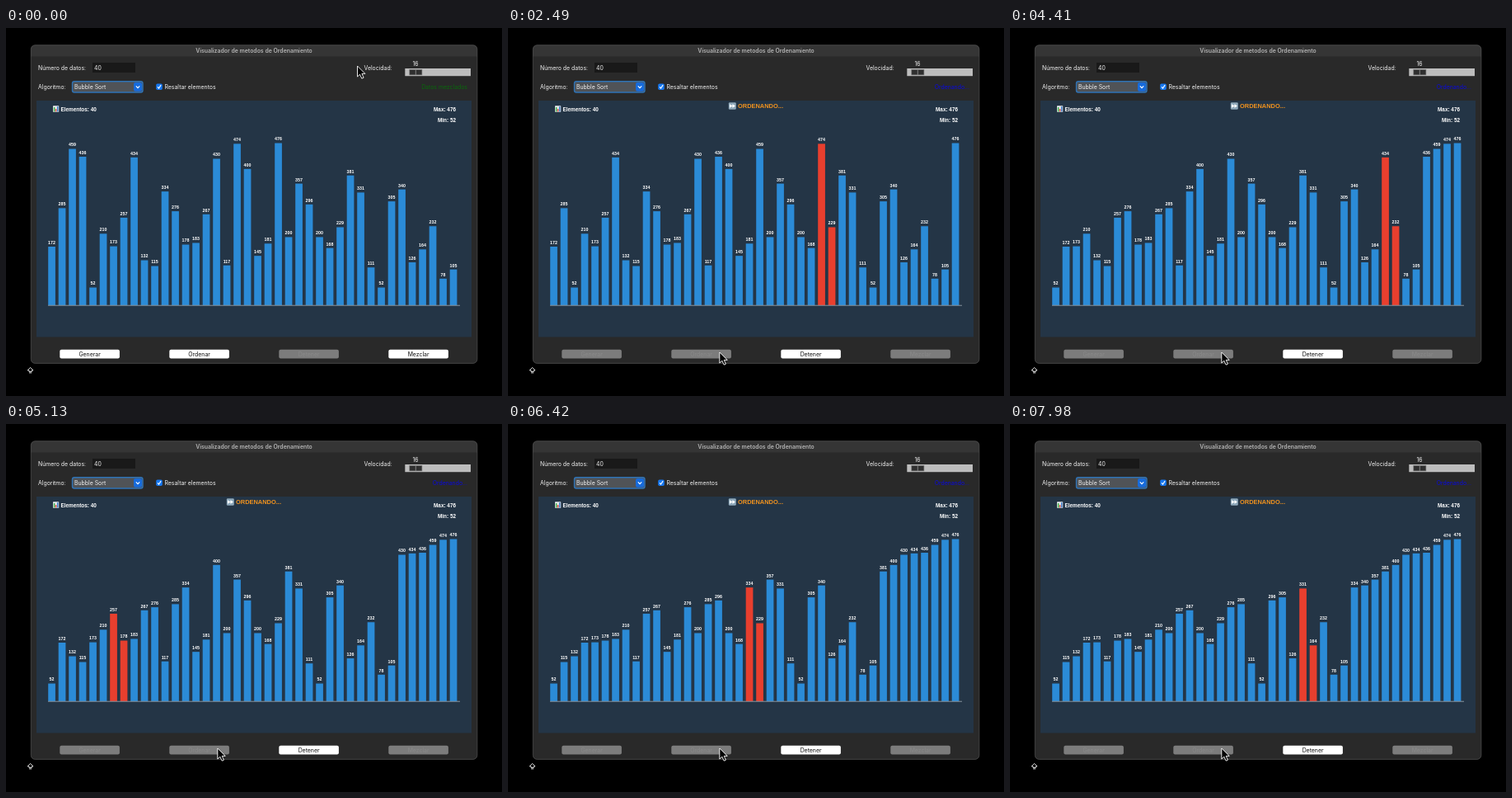
An HTML page that plays this animation: 602x446 px, repeating every 8 s.

```html
<!DOCTYPE html>
<html lang="es">
<head>
<meta charset="utf-8">
<title>Visualizador de metodos de Ordenamiento</title>
<style>
  html, body { margin: 0; width: 100%; height: 100%; overflow: hidden; background: #000; }
  svg { display: block; width: 100%; height: 100%; }
  text { font: 6.9px Inter, "Liberation Sans", sans-serif; fill: #f2f2f2; white-space: pre; }
  .plot text { font: bold 6.4px "Liberation Sans", Arial, sans-serif; fill: #fff; }
  .plot .value { font-size: 5.3px; text-anchor: middle; }
  .mid { text-anchor: middle; }
  .end { text-anchor: end; }
</style>
</head>
<body>
<svg viewBox="0 0 602 446" preserveAspectRatio="none">
  <rect width="602" height="446" fill="#000"/>
  <rect x="30.3" y="20.8" width="541.6" height="385.6" rx="5" fill="#292929"/>
  <path d="M30.3 34.5V25.8a5 5 0 0 1 5-5H566.9a5 5 0 0 1 5 5V34.5Z" fill="#353535"/>
  <rect x="30.3" y="20.8" width="541.6" height="385.6" rx="5" fill="none" stroke="#555" stroke-width=".7"/>
  <text x="301" y="30" class="mid" style="font-weight:600;fill:#b4b4b4" id="title">Visualizador de metodos de Ordenamiento</text>

  <text x="39" y="50.8">Número de datos:</text>
  <rect x="105" y="42" width="52" height="12" fill="#191919"/>
  <text x="107" y="50.6">40</text>
  <text x="434.5" y="50.8">Velocidad:</text>
  <text x="497" y="46.2" class="mid">16</text>
  <rect x="484.3" y="49" width="79.7" height="9.2" fill="#bdbdbd"/>
  <g fill="#303030" stroke="#777" stroke-width=".6">
    <rect x="489.8" y="50.4" width="7.3" height="6.5"/>
    <rect x="497.6" y="50.4" width="7.3" height="6.5"/>
  </g>

  <text x="39" y="74.3">Algoritmo:</text>
  <rect x="80.5" y="64.8" width="85.5" height="13.2" rx="2.5" fill="#505357" stroke="#2f73b5" stroke-width="1.4"/>
  <text x="83" y="74">Bubble Sort</text>
  <rect x="155" y="66" width="10" height="10.8" rx="2" fill="#176bdb"/>
  <path d="M157.8 70.4L160 72.7L162.2 70.4" fill="none" stroke="#fff" stroke-width="1.1"/>
  <rect x="182.2" y="67.4" width="7.6" height="7.6" rx="1.7" fill="#1677ef"/>
  <path d="M184 71.3L185.5 73L188.1 69.1" fill="none" stroke="#fff" stroke-width="1.1"/>
  <text x="192.5" y="74.3">Resaltar elementos</text>
  <text x="560" y="74.3" class="end" id="status"></text>

  <g class="plot">
    <rect x="37" y="88" width="528" height="286.5" fill="#243546"/>
    <rect x="57" y="94.2" width="7.2" height="7.6" rx=".6" fill="#e6eaec"/>
    <path d="M58.6 96V101.3" stroke="#3fae49" stroke-width="1.5"/>
    <path d="M60.6 98V101.3" stroke="#d9483b" stroke-width="1.5"/>
    <path d="M62.7 95V101.3" stroke="#3a78c9" stroke-width="1.5"/>
    <text x="66.5" y="100.5">Elementos: 40</text>
    <text x="546" y="100.5" class="end">Max: 476</text>
    <text x="546" y="113.6" class="end">Min: 52</text>
    <g id="running">
      <rect x="267.8" y="90.2" width="9" height="8.6" rx="1.4" fill="#8fa9bb"/>
      <path d="M269 92.2L272.6 94.5L269 96.8ZM272.4 92.2L276 94.5L272.4 96.8Z" fill="#fff"/>
      <text x="279" y="97.1" style="font-size:7.45px;fill:#f0921e">ORDENANDO...</text>
    </g>
    <g id="bars"></g>
    <path d="M51 336.3H551" stroke="#86929b" stroke-width="1.1"/>
  </g>

  <g id="buttons"></g>

  <path d="M29.6 411.4L33 415H31.2V416.4H28V415H26.2ZM28 417.9H31.2" fill="none" stroke="#ddd" stroke-width="1"/>
  <path id="cursor" d="M0 0V13L3 10.2L5.3 15.2L7.6 14.2L5.4 9.4H9.4Z" fill="#000" stroke="#fff" stroke-width=".9" stroke-linejoin="round"/>
</svg>
<script>
const LOOP = 8000, FRAME = 30;
const SORT_START = 1408, STEP = 16.49;
const BASE = 336, SCALE = 0.4128;
const START = [
  172, 285, 459, 436, 52, 210, 173, 257, 434, 132,
  115, 334, 276, 178, 183, 267, 430, 117, 474, 400,
  145, 181, 476, 200, 357, 296, 200, 168, 229, 381,
  331, 111, 52, 305, 340, 126, 164, 232, 78, 105
];
// Pointer stops: time, x, y
const PATH = [[0, 426.5, 46], [240, 310, 428], [360, 310, 428], [1080, 256.8, 393]];

const $ = id => document.getElementById(id);

function add(parent, tag, attrs) {
  const el = document.createElementNS("http://www.w3.org/2000/svg", tag);
  for (const k in attrs) el.setAttribute(k, attrs[k]);
  return parent.appendChild(el);
}

const bars = START.map((_, i) => {
  const x = 51.2 + 12.5 * i;
  return {
    rect: add($("bars"), "rect", { x, width: 8.7 }),
    label: add($("bars"), "text", { x: x + 4.3, class: "value" })
  };
});

const buttons = ["Generar", "Ordenar", "Detener", "Mezclar"].map((name, i) => {
  const x = 65.3 + 133 * i;
  const rect = add($("buttons"), "rect", { x, y: 389.8, width: 72.6, height: 10.8, rx: 2 });
  const label = add($("buttons"), "text", { x: x + 36.3, y: 397.5, class: "mid" });
  label.textContent = name;
  return { rect, label };
});

// Bubble sort stopped just before the given comparison
function sortState(count) {
  const data = START.slice();
  for (let i = 0; i < data.length; i++) {
    for (let j = 0; j < data.length - 1 - i; j++) {
      if (count-- === 0) return { data, active: j };
      if (data[j] > data[j + 1]) [data[j], data[j + 1]] = [data[j + 1], data[j]];
    }
  }
  return { data, active: -9 };
}

function pointer(t) {
  const n = PATH.findIndex(p => p[0] > t);
  if (n < 0) return PATH[PATH.length - 1].slice(1);
  const [a, b] = [PATH[n - 1], PATH[n]];
  const u = (t - a[0]) / (b[0] - a[0]);
  const e = u * u * (3 - 2 * u);
  return [a[1] + (b[1] - a[1]) * e, a[2] + (b[2] - a[2]) * e];
}

function draw(t) {
  const sorting = t >= SORT_START;
  const { data, active } = sorting
    ? sortState(Math.floor((t - SORT_START) / STEP))
    : { data: START, active: -9 };

  bars.forEach(({ rect, label }, i) => {
    const height = data[i] * SCALE;
    const hot = i === active || i === active + 1;
    rect.setAttribute("y", BASE - height);
    rect.setAttribute("height", height);
    rect.setAttribute("fill", hot ? "#e83f2e" : "#2b8bd7");
    label.setAttribute("y", BASE - height - 3.1);
    label.textContent = data[i];
  });

  buttons.forEach(({ rect, label }, i) => {
    const enabled = (i === 2) === sorting;
    rect.setAttribute("fill", enabled ? "#fff" : "#7c7c7c");
    label.style.fill = enabled ? "#111" : "#8a8a8a";
  });

  $("running").style.display = sorting ? "" : "none";
  $("status").textContent = sorting ? "Ordenando..." : "Datos mezclados";
  $("status").style.fill = sorting ? "#0909e0" : "#086a0b";
  $("cursor").setAttribute("transform", `translate(${pointer(t)})`);
}

function tick(now) {
  draw(Math.floor(now % LOOP / FRAME) * FRAME);
  requestAnimationFrame(tick);
}

draw(0);
requestAnimationFrame(tick);
</script>
</body>
</html>
```
